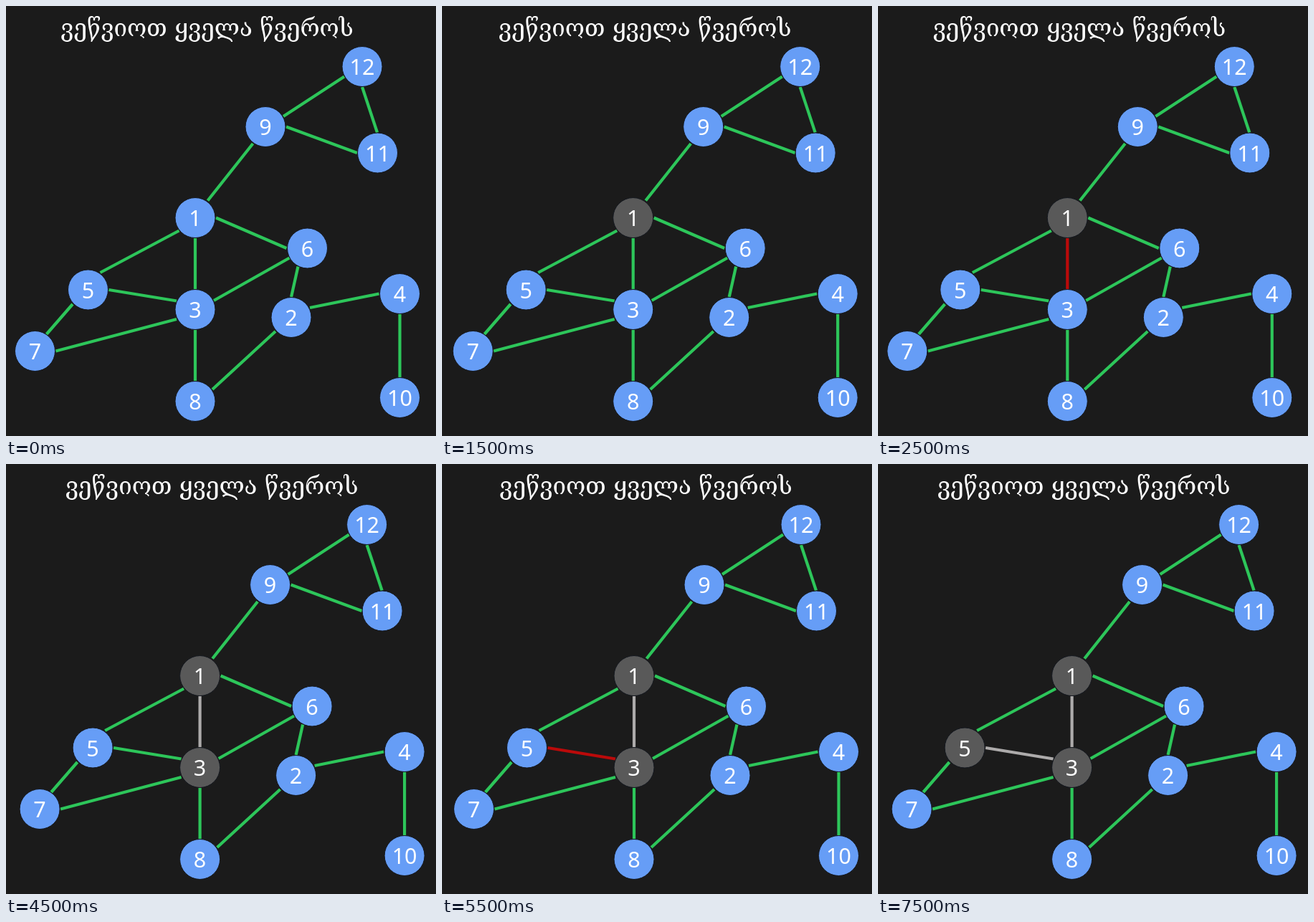
An HTML page that plays this animation: 600 by 600 pixels, repeating every 8000 ms.

```html
<!DOCTYPE html>
<html lang="ka">
<head>
<meta charset="utf-8">
<style>
html, body { margin: 0; width: 100%; height: 100%; overflow: hidden; background: #1b1b1b; }
svg { display: block; width: 600px; height: 600px; }
text { fill: #fff; text-anchor: middle; font: 500 30.5px "Noto Sans", "Open Sans", sans-serif; }
#title { font: 33px "DejaVu Serif", serif; }
line { stroke-width: 4.2; }
circle { stroke: #14181f; stroke-width: 1; }
</style>
</head>
<body>
<svg viewBox="0 0 600 600"><g id="graph"><text id="title" x="280.5" y="42">ვეწვიოთ ყველა წვეროს</text></g></svg>
<script>
const BLUE = '#669df6', GREEN = '#2dc65a', RED = '#bb0a0a', GREY = '#595959', PALE = '#adabab';
const graph = document.getElementById('graph');

const nodes = {
  1: [264, 295.5], 2: [398, 434.5], 3: [264, 423.5], 4: [549.5, 401.5],
  5: [114.5, 396], 6: [420.5, 338], 7: [40.5, 481.5], 8: [264, 551.5],
  9: [362, 168.5], 10: [549.5, 546.5], 11: [518.5, 205], 12: [497, 84.5]
};
const edges = {
  '9-12': [387, 154, 472, 98.5], '11-12': [497, 113, 518, 176.5],
  '9-11': [391, 168.5, 490, 205], '1-9': [281.5, 271.5, 344.5, 192],
  '1-6': [293, 295.5, 391.5, 338], '1-5': [241.5, 313.5, 131.5, 372],
  '1-3': [264, 324, 264, 395], '3-5': [143.5, 396, 238, 411.5],
  '3-6': [290, 411, 395.5, 351.5], '5-7': [93, 416, 56.5, 458],
  '3-7': [69.5, 481.5, 238, 437], '3-8': [264, 452, 264, 523],
  '2-6': [407.5, 363.5, 398, 406], '2-8': [376, 454, 288, 535],
  '2-4': [424, 421, 520.5, 401.5], '4-10': [549.5, 430, 549.5, 518]
};

// Each step lists what it recolours; dx is the sideways jitter of the picture.
const steps = [
  { at: 0, dx: 0 },
  { at: 500, dx: 4.7, 1: RED },
  { at: 1500, dx: 2.7, 1: GREY },
  { at: 2500, dx: 0.3, '1-3': RED },
  { at: 3500, dx: 1.3, '1-3': PALE, 3: RED },
  { at: 4500, dx: 6.6, 3: GREY },
  { at: 5500, dx: 4, '3-5': RED },
  { at: 6500, dx: 1.3, '3-5': PALE, 5: RED },
  { at: 7500, dx: 6.6, 5: GREY }
];

function add(tag, attrs, label) {
  const el = document.createElementNS('http://www.w3.org/2000/svg', tag);
  for (const key in attrs) el.setAttribute(key, attrs[key]);
  if (label) el.textContent = label;
  return graph.appendChild(el);
}

const edgeEls = {}, nodeEls = {};
for (const id in edges) {
  const [x1, y1, x2, y2] = edges[id];
  edgeEls[id] = add('line', { x1, y1, x2, y2 });
}
for (const id in nodes) {
  const [x, y] = nodes[id];
  nodeEls[id] = add('circle', { cx: x, cy: y, r: 28 });
  add('text', { x, y: y + 11.5 }, id);
}

function draw() {
  const t = performance.now() % 8000;
  const state = Object.assign({}, ...steps.filter(step => step.at <= t));
  graph.setAttribute('transform', `translate(${state.dx})`);
  for (const id in edgeEls) edgeEls[id].setAttribute('stroke', state[id] || GREEN);
  for (const id in nodeEls) nodeEls[id].setAttribute('fill', state[id] || BLUE);
  requestAnimationFrame(draw);
}
draw();
</script>
</body>
</html>
```
